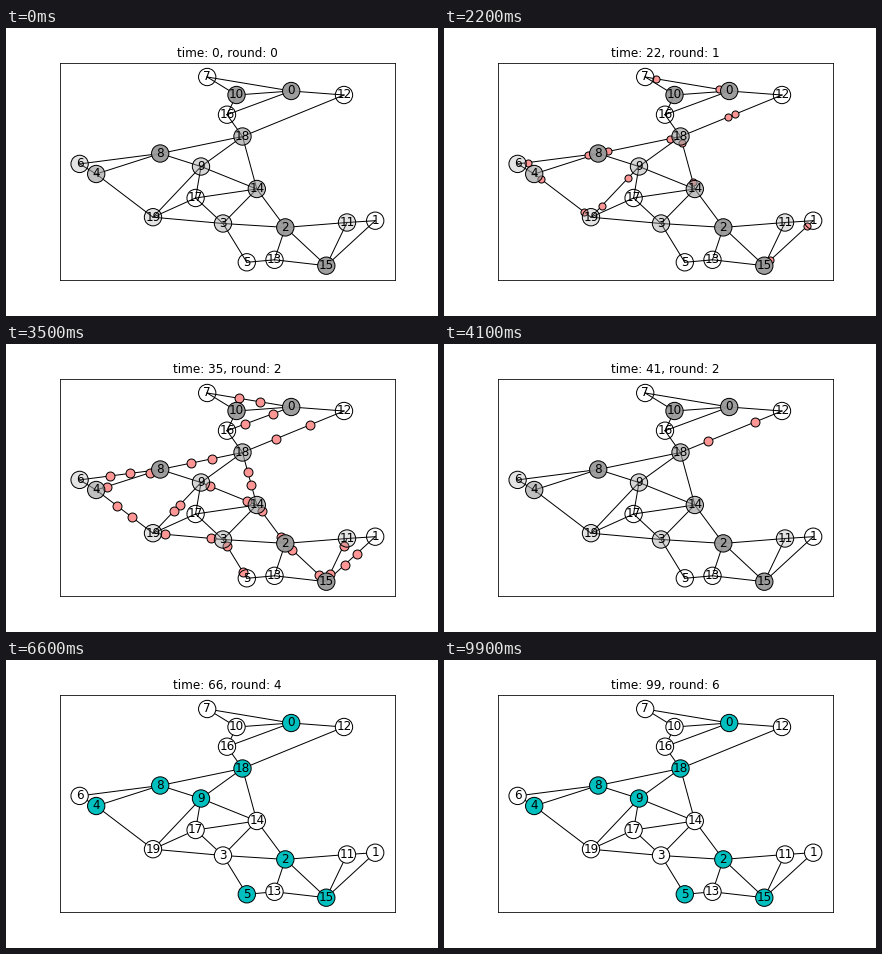
A matplotlib script for the animation above (10 s loop, 432x288 px).

```python
from itertools import pairwise
from math import exp, hypot

import matplotlib.pyplot as plt
from matplotlib.animation import FuncAnimation
from matplotlib.colors import to_rgba

FRAMES, STEP_MS, ROUND = 100, 100, 15
LEFT, RIGHT, TOP, BOTTOM = 54, 388.8, 34.56, 252
ASPECT = (RIGHT - LEFT) / (BOTTOM - TOP)

# Node centres in pixels, y pointing down
POS = [(285.2, 63), (369.2, 192.7), (279.3, 199.4), (217, 195.5), (90.2, 146),
       (240.8, 234.3), (73.6, 135.9), (201.2, 49), (154.2, 125.5), (195, 138.5),
       (230.5, 67), (341, 194.5), (338, 67), (268.5, 231.8), (250.8, 161),
       (320.3, 237.7), (221, 86.7), (189.6, 170), (236.5, 108.5), (147, 189.2)]

# Consecutive nodes of a trail are linked
TRAILS = [(10, 7, 0, 10, 16, 0, 12, 18, 16),
          (4, 6, 8, 4, 19, 9, 8, 18, 9, 17, 19, 3, 17, 14, 9),
          (18, 14, 3, 2, 14),
          (3, 5, 13, 2, 15, 13),
          (2, 11, 15, 1, 11)]
LINKS = [(POS[a], POS[b]) for trail in TRAILS for a, b in pairwise(trail)]

# Grey nodes from dark to faint, and the nodes chosen later
TIERS = [(0, 2, 8, 10, 15), (4, 14, 18), (3, 9), (6, 11, 19)]
LEADERS = {0, 2, 4, 8, 9, 15, 18}


def delay(p, q):
    """Steps a message needs; long links are disproportionately slow."""
    length = hypot(q[0] - p[0], (q[1] - p[1]) * ASPECT)
    return int(2.03 * exp(0.017 * length))


def messages(step):
    """Points of all messages under way, both directions of every link."""
    points = []
    for p, q in LINKS:
        f = step / delay(p, q)
        if 0 < f < 1:
            points += [tuple(u + (v - u) * g for u, v in zip(p, q))
                       for g in (f, 1 - f)]
    return points


def node_colors(rnd):
    if rnd < 3:
        alpha = {i: 0.95 * 0.65 ** k for k, tier in enumerate(TIERS) for i in tier}
        return [(0.6, 0.6, 0.6, alpha.get(i, 0)) for i in range(len(POS))]
    chosen = LEADERS | {5} if rnd > 3 else LEADERS
    return [to_rgba("c" if i in chosen else "w") for i in range(len(POS))]


plt.rcParams["text.kerning_factor"] = 6
fig = plt.figure(figsize=(6, 4), dpi=72)
ax = fig.add_axes([0.125, 0.125, 0.775, 0.755])
ax.set(xlim=(LEFT, RIGHT), ylim=(BOTTOM, TOP), xticks=[], yticks=[])
title = ax.set_title("", fontsize=12)

for p, q in LINKS:
    ax.plot(*zip(p, q), color="k", lw=1, zorder=1)
dots = ax.scatter([], [], c="#ff9696", edgecolors="k", linewidths=1, zorder=2)
nodes = ax.scatter(*zip(*POS), s=300, edgecolors="k", linewidths=1, zorder=3)
for i, (x, y) in enumerate(POS):
    ax.text(x, y, str(i), size=12, ha="center", va="center", zorder=4)


def update(t):
    rnd, step = divmod(t, ROUND)
    title.set_text(f"time: {t}, round: {rnd}")
    nodes.set_facecolor(node_colors(rnd))
    points = messages(step) if 1 <= rnd <= 3 else []
    dots.set_offsets(points or [(-99, -99)])
    dots.set_sizes([50 if rnd == 1 else 80])
    return title, nodes, dots


anim = FuncAnimation(fig, update, frames=FRAMES, interval=STEP_MS,
                     repeat=True, repeat_delay=0)
plt.show()
```
